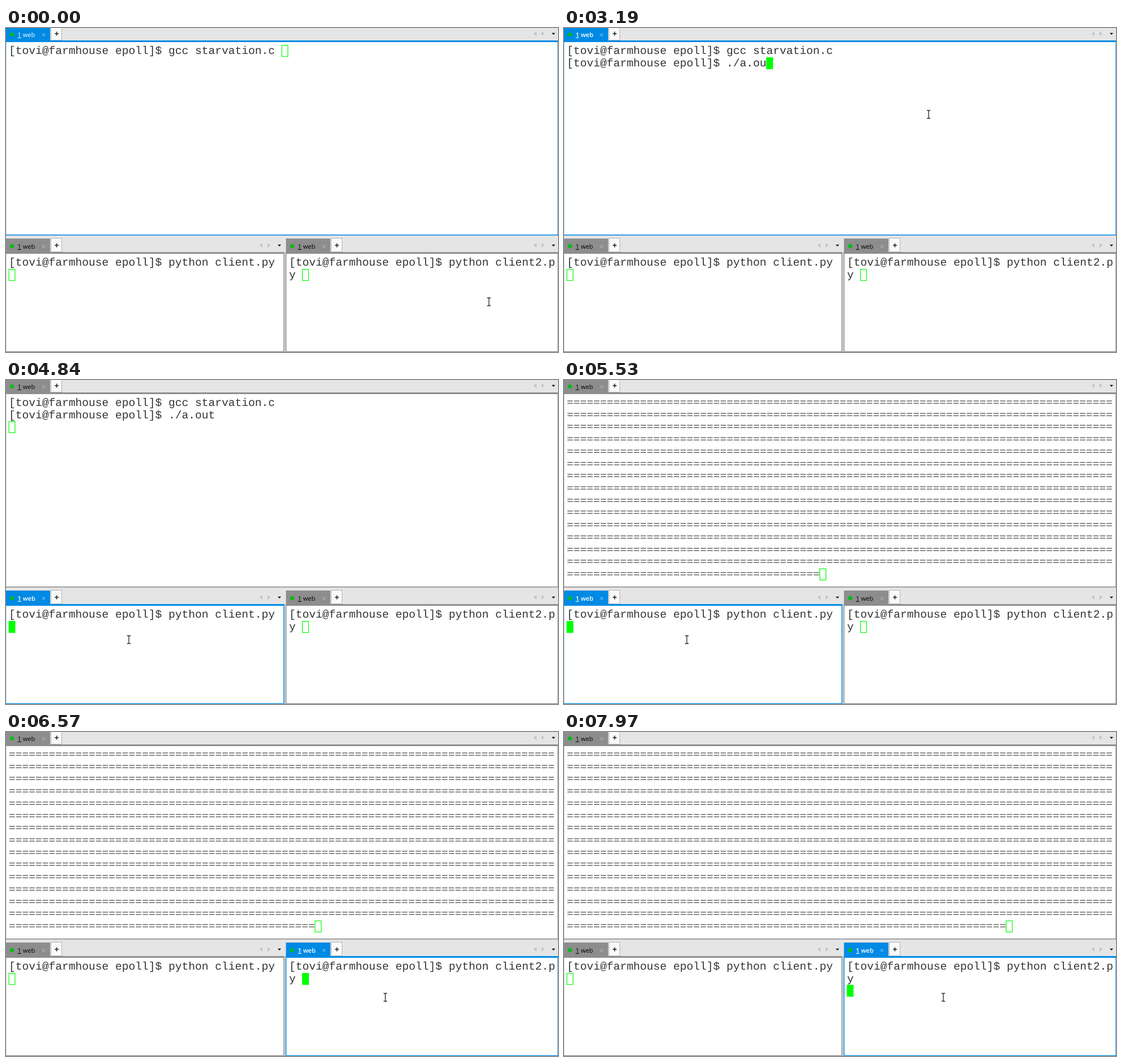
These frames come from a looping animation (975x574 px, 8000 ms). An HTML page:

```html
<!DOCTYPE html>
<html lang="en">
<head>
<meta charset="utf-8">
<title>Terminal session</title>
<style>
  html, body { margin: 0; width: 100%; height: 100%; overflow: hidden; background: #e5e5e5; }
  svg { display: block; width: 975px; height: 574px; text-rendering: geometricPrecision; }
  text { white-space: pre; }
  .pane { --accent: #8d8d8d; --label: #000; --mark: #c4c4c4; }
  .pane.focus { --accent: #008ae4; --label: #fff; --mark: #a9d6f5; }
  .accent { fill: var(--accent); }
  .frame { fill: #fff; stroke: var(--accent); stroke-width: 1.6; }
  .label { font: 11px "Open Sans", "Noto Sans", sans-serif; fill: var(--label); }
  .active .label { font-weight: 600; }
  .label tspan { text-decoration: underline; }
  .close { stroke: var(--mark); fill: none; }
  .line { font: 19.59px "Liberation Mono", monospace; fill: #333; }
  .bars { font: 20.5px "Liberation Serif", serif; letter-spacing: .195px; fill: #222; }
  .cursor { fill: #fff; stroke: #0f0; stroke-width: 1.2; }
  .active .cursor { fill: #0f0; }
</style>
</head>
<body>
<svg viewBox="0 0 975 574">
  <rect width="975" height="574" fill="#e5e5e5"/>
  <g id="panes"></g>
  <g id="beam" fill="none" stroke="#222" stroke-width="1.3">
    <path d="M-3-7H-1L0-6 1-7H3M0-6V6M-3 7H-1L0 6 1 7H3"/>
  </g>
  <path id="arrow" d="M-3-8V7L.5 3.8 3 9.2 5.4 8.1 3 2.9H7.6Z" fill="#fff" stroke="#222"/>
</svg>
<script>
const LOOP = 8000, COL = 11.756, ROW = 21.71, COLS = 82;
const PROMPT = "[tovi@farmhouse epoll]$ ";
const COMMAND = "./a.out";
const KEY_TIMES = [1880, 2020, 2420, 2730, 2960, 3190, 3270];
const FLOOD_START = 5530, FLOOD_STEP = 73.8;
// [step, characters printed on the running last line]
const FLOOD = [[0, 38], [14, 128], [22, 160], [23, 170], [33, 230]];
// [time, x, y, is arrow]
const POINTER = [
  [0, 853, 485], [60, 748, 319], [110, 644, 153],
  [4250, 600, 192], [4320, 470, 265], [4400, 300, 355],
  [4480, 217, 399, true], [4550, 217, 432], [4620, 217, 460],
  [6200, 262, 452], [6270, 360, 448], [6350, 520, 456],
  [6420, 640, 466], [6497, 670, 470]
];
const $ = id => document.getElementById(id);

function makePane(x, y, width, height, rows) {
  const g = document.createElementNS("http://www.w3.org/2000/svg", "g");
  const lines = Array.from({ length: rows }, (_, r) =>
    `<text class="line" x="5" y="${46 + r * ROW}"></text>`).join("");
  g.setAttribute("transform", `translate(${x} ${y})`);
  g.innerHTML = `
    <rect class="frame" x="-.5" y="23" width="${width + .5}" height="${height - 23}"/>
    <rect class="accent" x="-.5" y="22" width="${width + .5}" height="3"/>
    <rect class="accent" x="-.5" y="-2" width="78.5" height="24.5"/>
    <circle cx="10.5" cy="11.5" r="3.6" fill="#0b1c0b" style="fill:#00bc14"/>
    <text class="label" x="20.5" y="15.7"><tspan>1</tspan> web</text>
    <path class="close" d="M64 9.5l5 5m0-5l-5 5"/>
    <rect x="79.5" y="-2.5" width="19" height="24" fill="#fafafa" stroke="#b5b5b5"/>
    <path d="M86 10H93M89.5 6.5V13.5" stroke="#222" stroke-width="1.6"/>
    <path d="M${width - 38} 6v8l-5-4zM${width - 29} 6v8l5-4z" fill="#c3c3c3"/>
    <path d="M${width - 11} 8.7h6l-3 3.2z" fill="#000"/>
    ${lines}
    <rect class="cursor" width="10.8" height="19.8"/>`;
  $("panes").append(g);
  return { g, lines: [...g.querySelectorAll(".line, .bars")], cursor: g.querySelector(".cursor") };
}

const top_ = makePane(0, 0, 975, 366.7, 15);
const left = makePane(0, 375, 491, 198.5, 2);
const right = makePane(495, 375, 480, 198.5, 2);

function setLine(pane, row, text, bars = false) {
  const el = pane.lines[row];
  if (el.textContent !== text) el.textContent = text;
  el.setAttribute("class", bars ? "bars" : "line");
}

function setCursor(pane, col, row) {
  pane.cursor.setAttribute("x", 5.1 + col * COL);
  pane.cursor.setAttribute("y", Math.round(30 + row * ROW) + .5);
}

function setFocus(pane, focused, active) {
  pane.g.setAttribute("class", "pane" + (focused ? " focus" : "") + (active ? " active" : ""));
}

function floodCol(t) {
  const n = Math.min(33, Math.floor((t - FLOOD_START) / FLOOD_STEP));
  const i = FLOOD.findIndex(([step]) => step > n);
  if (i < 0) return FLOOD.at(-1)[1] % COLS;
  const [a, from] = FLOOD[i - 1], [b, to] = FLOOD[i];
  return Math.round(from + (to - from) * (n - a) / (b - a)) % COLS;
}

function drawTop(t) {
  if (t >= FLOOD_START) {
    const col = floodCol(t);
    for (let r = 0; r < 15; r++) setLine(top_, r, "=".repeat(r < 14 ? COLS : col), true);
    return setCursor(top_, col, 14);
  }
  const typed = COMMAND.slice(0, KEY_TIMES.filter(k => k <= t).length);
  const second = t >= 1110 ? PROMPT + typed : "";
  top_.lines.forEach((_, r) =>
    setLine(top_, r, r === 0 ? PROMPT + "gcc starvation.c" : r === 1 ? second : ""));
  if (t < 1050) setCursor(top_, 41, 0);
  else if (t < 3650) setCursor(top_, second.length, 1);
  else setCursor(top_, 0, 2);
}

function drawPointer(t) {
  const [, x, y, isArrow] = POINTER.findLast(p => p[0] <= t);
  for (const id of ["beam", "arrow"]) {
    $(id).setAttribute("transform", `translate(${x} ${y})`);
    $(id).style.display = (id === "arrow") === !!isArrow ? "" : "none";
  }
}

function draw(t) {
  const current = t < 4770 ? top_ : t < 6500 ? left : right;
  for (const p of [top_, left, right]) setFocus(p, p === current, p === current && t >= 270);
  drawTop(t);
  if (t < 6865) setCursor(right, 2, 1);
  else setCursor(right, 0, 2);
  drawPointer(t);
}

setLine(left, 0, PROMPT + "python client.py");
setLine(right, 0, PROMPT + "python client2.p");
setLine(right, 1, "y");
setCursor(left, 0, 1);

const start = performance.now();
function frame() {
  draw((performance.now() - start) % LOOP);
  requestAnimationFrame(frame);
}
draw(0);
requestAnimationFrame(frame);
</script>
</body>
</html>
```
